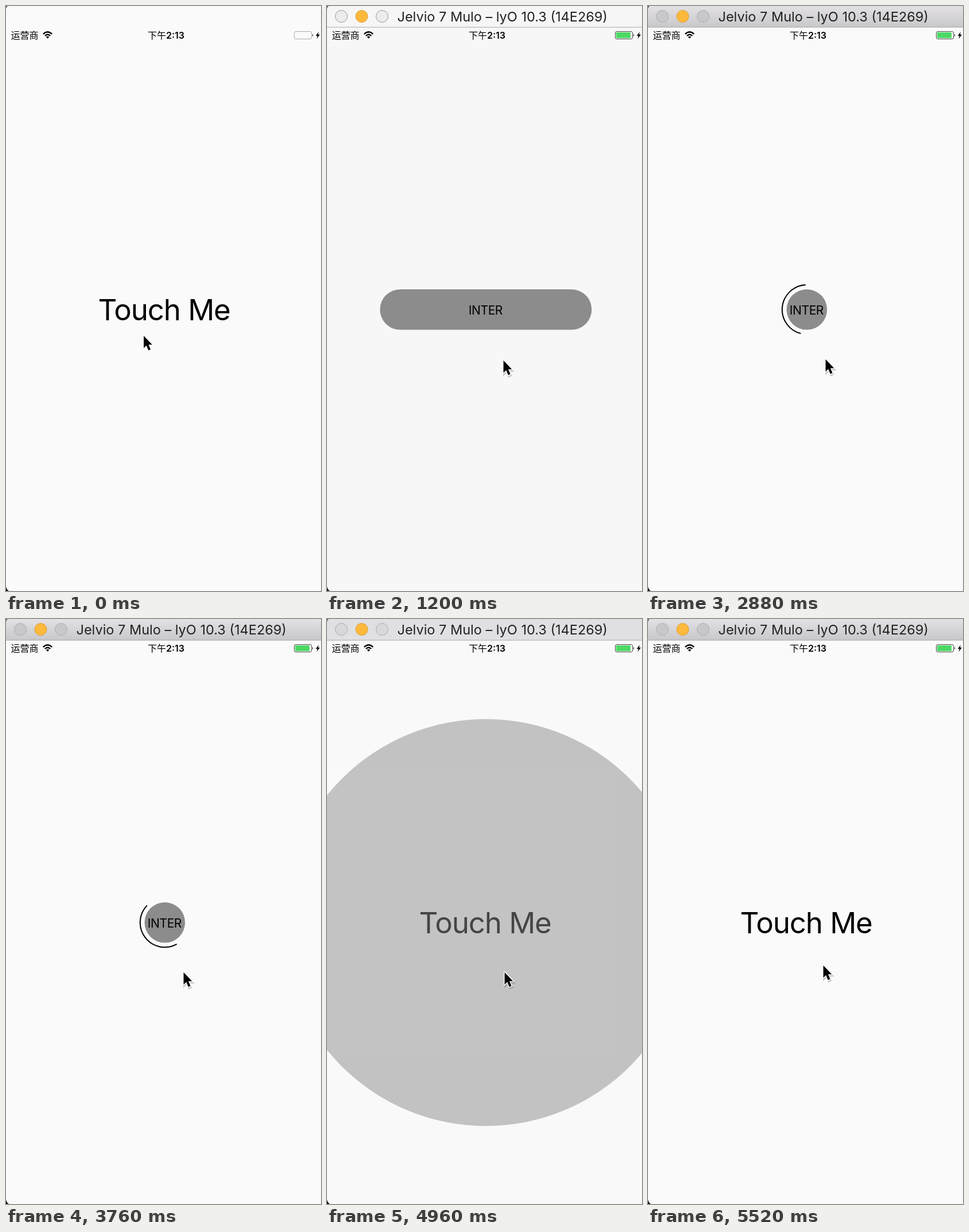
An HTML page that plays this animation: 549 by 1020 pixels, repeating every 5.6 s.

```html
<!DOCTYPE html>
<html lang="zh">
<head>
<meta charset="utf-8">
<title>Button transition</title>
<style>
  html, body { margin: 0; width: 100%; height: 100%; overflow: hidden; background: #fafafa; }
  svg { display: block; width: 100vw; height: 100vh; }
  text { font-family: Inter, "Noto Sans CJK SC", "Noto Sans CJK", sans-serif; }
</style>
</head>
<body>
<svg viewBox="0 0 549 1020">
  <defs>
    <linearGradient id="barFill" x1="0" y1="0" x2="0" y2="1">
      <stop id="barTop" offset="0"/>
      <stop offset="1" stop-color="#c8c7c9"/>
    </linearGradient>
    <path id="arrow" d="M0 0V21.5L4.7 17L8.3 25.4L12 23.8L8.4 15.5H14.8Z"/>
  </defs>

  <rect id="page" width="549" height="1020"/>
  <rect id="button" fill="#8c8c8c"/>
  <text id="enter" x="276.4" y="537.6" font-size="21" letter-spacing="-.4" text-anchor="middle">INTER</text>
  <path id="spinner" fill="none" stroke="#000" stroke-width="2"/>

  <g id="touch">
    <rect width="549" height="1020" fill="#fafafa"/>
    <text x="275.6" y="548.2" font-size="51" letter-spacing="-1.1" text-anchor="middle">Touch Me</text>
  </g>

  <g id="bar">
    <rect id="barBack" width="549" height="37"/>
    <path d="M0 37H549" stroke="#a6a6a6"/>
    <g stroke-width="1">
      <circle class="dim" cx="25" cy="18" r="10.5"/>
      <circle cx="60.5" cy="18" r="10.5" fill="#fdb93c" stroke="#dd9e33"/>
      <circle class="dim" cx="96" cy="18" r="10.5"/>
    </g>
    <text x="122.5" y="26.8" font-size="23.5" fill="#222">Jelvio 7 Mulo – lyO 10.3 (14E269)</text>
  </g>

  <text x="8.5" y="57" font-size="16">运营商</text>
  <g fill="none" stroke="#000" stroke-width="2.3">
    <path d="M64.8 49Q72.5 41.6 80.2 49"/>
    <path d="M67.8 52Q72.5 47.5 77.2 52"/>
  </g>
  <path d="M72.5 56.8L69.8 54Q72.5 51.5 75.2 54Z"/>
  <text x="279" y="57" font-size="16" font-weight="600" text-anchor="middle"><tspan font-weight="500">下午</tspan>2:13</text>
  <rect id="battery" x="502.5" y="44.5" width="30" height="13" rx="2.5" fill="none"/>
  <rect id="charge" x="504" y="46" width="25" height="10" rx="1" fill="#4cd964"/>
  <path d="M534 48.5Q536 51 534 53.5Z"/>
  <path d="M545 45L539.8 52H542.8L541.5 57.2L547 49.8H543.8Z"/>

  <path d="M0 0H3Q1 1 0 5Z" fill="#555"/>
  <path d="M0 1012Q1 1018 5 1020H0Z" fill="#111"/>

  <g id="cursor">
    <use id="shade" href="#arrow" x="1" y="2.5" fill="#000" stroke="#000" stroke-width="3" opacity=".2"/>
    <use href="#arrow" stroke="#fff" stroke-width="3" paint-order="stroke" stroke-linejoin="round"/>
  </g>
</svg>
<script>
const LOOP = 5600, STEP = 80;
const CX = 276.8, CY = 529.3, R = 35.3, PILL = 369;
const DISMISS = 480, SHRINK = 1760, SPIN = 2240, GROW = 4744, FADE = 430;

// time, x, y of the pointer tip
const pointer = [
  [0, 240, 575], [80, 244, 572], [320, 286, 533], [560, 286, 533],
  [1120, 307.5, 618], [1200, 307.5, 618], [1680, 296, 549], [1840, 296, 549],
  [2080, 300.5, 578], [2480, 309.5, 616], [5120, 309.5, 616], [5520, 305.5, 604]
];

const $ = id => document.getElementById(id);
const clamp = v => Math.min(1, Math.max(0, v));
const ease = v => { const p = clamp(v); return p * p * (3 - 2 * p); };
const within = (t, from, to) => t >= from && t < to;

function set(node, attrs) {
  for (const key in attrs) node.setAttribute(key, attrs[key]);
}

function show(node, on) {
  node.style.display = on ? "" : "none";
}

function pointerAt(t) {
  const next = pointer.findIndex(p => p[0] > t);
  if (next < 0) return pointer[pointer.length - 1].slice(1);
  const [t0, x0, y0] = pointer[next - 1], [t1, x1, y1] = pointer[next];
  const k = ease((t - t0) / (t1 - t0));
  return [x0 + (x1 - x0) * k, y0 + (y1 - y0) * k];
}

function polar(deg, r) {
  const a = deg * Math.PI / 180;
  return `${CX + r * Math.cos(a)} ${CY + r * Math.sin(a)}`;
}

function drawButton(t) {
  const shrink = ease((t - SHRINK) / 400);
  const r = R + 1.479 * Math.max(0, t - GROW);
  const half = t < GROW ? PILL / 2 + (R - PILL / 2) * shrink : r;
  set($("button"), { x: CX - half, y: CY - r, width: 2 * half, height: 2 * r, rx: r });
  show($("enter"), t < GROW);
}

function drawSpinner(t) {
  const start = 61 + (t - 3760) * .36;
  set($("spinner"), { d: `M${polar(start, 43)}A43 43 0 0 1 ${polar(start + 163, 43)}` });
  show($("spinner"), within(t, SPIN, GROW));
}

function drawChrome(t) {
  const pale = within(t, DISMISS, SHRINK) || within(t, GROW, 4960);
  const flat = within(t, 4960, 5120);
  const ready = t >= DISMISS;
  show($("bar"), ready);
  show($("charge"), ready);
  show($("shade"), ready);
  set($("battery"), { stroke: ready ? "#444" : "#aaa" });
  set($("page"), { fill: pale ? "#f7f7f7" : "#fafafa" });
  set($("barTop"), { "stop-color": within(t, SHRINK, SPIN) ? "#f6f5f6" : "#e3e1e4" });
  set($("barBack"), { fill: pale ? "#f6f6f6" : flat ? "#e0dfe2" : "url(#barFill)" });
  for (const dot of document.querySelectorAll(".dim")) {
    set(dot, { fill: pale ? "#ececec" : flat ? "#d8d7d9" : "#c8c7c9", stroke: pale ? "#999" : "#adacae" });
  }
}

function draw(t) {
  drawButton(t);
  drawSpinner(t);
  drawChrome(t);
  const cover = t < GROW ? 1 - ease((t - DISMISS) / FADE) : ease((t - GROW) / FADE);
  set($("touch"), { opacity: cover });
  set($("cursor"), { transform: `translate(${pointerAt(t)})` });
}

const began = performance.now();
function tick() {
  const t = (performance.now() - began) % LOOP;
  draw(Math.floor(t / STEP) * STEP);
  requestAnimationFrame(tick);
}
tick();
</script>
</body>
</html>
```
